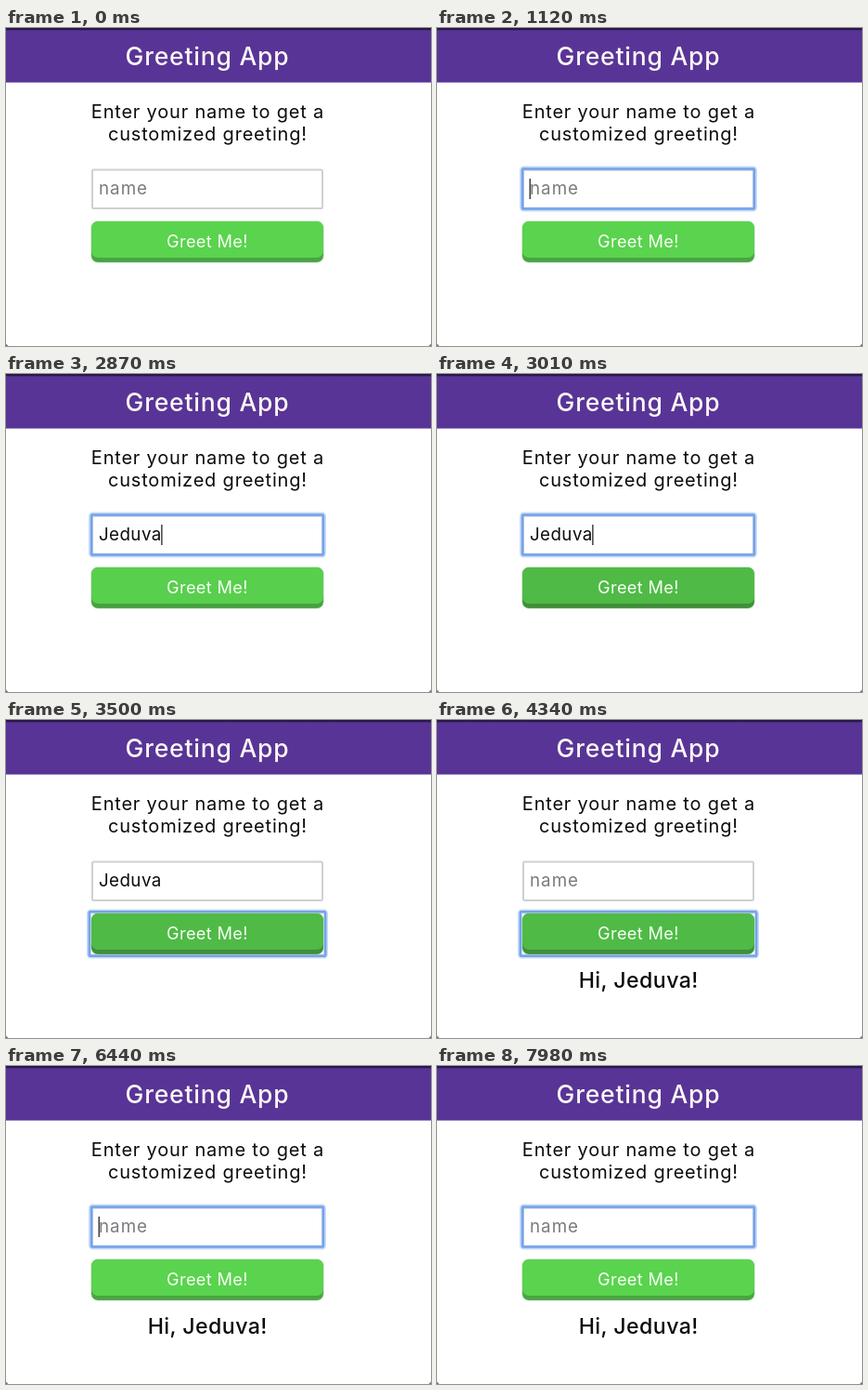
These frames come from a looping animation (458 px wide and 342 px high, 8 s). An HTML page:

```html
<!DOCTYPE html>
<html lang="en">
<head>
<meta charset="utf-8">
<title>Greeting App</title>
<style>
  html, body { margin: 0; width: 100%; height: 100%; overflow: hidden; background: #fff; }
  svg { display: block; width: 458px; height: 342px; }
  text { font-family: Inter, "Open Sans", sans-serif; fill: #0c0c0c; white-space: pre; }
  .mid { text-anchor: middle; }
  .title { font-size: 26.5px; font-weight: 500; letter-spacing: .8px; fill: #fbf8f4; }
  .intro { font-size: 20px; letter-spacing: .8px; }
  .field { font-size: 18.8px; letter-spacing: .4px; }
  .hint { letter-spacing: 1px; fill: #7b7b80; }
  .label { font-size: 18.2px; letter-spacing: .35px; fill: #f7fff5; }
  .reply { font-size: 23.2px; font-weight: 450; letter-spacing: .4px; }
  .ring rect { fill: none; }
  .glow { stroke: #a9c8f4; stroke-width: 5; opacity: .65; }
  .line { stroke: #74a3e8; stroke-width: 2.4; }
</style>
</head>
<body>
<svg viewBox="0 0 458 342">
  <defs>
    <linearGradient id="edge" x2="0" y2="1">
      <stop offset="0" stop-color="#2c1a4c"/>
      <stop offset=".4" stop-color="#21143a"/>
      <stop offset="1" stop-color="#593497"/>
    </linearGradient>
    <clipPath id="pill"><rect x="92" y="208" width="250" height="44" rx="7"/></clipPath>
  </defs>
  <rect width="458" height="342" fill="#fff"/>
  <rect width="458" height="58.6" fill="#593497"/>
  <rect width="458" height="3" fill="url(#edge)"/>
  <path d="M0 339.5V342H2.5ZM458 339.5V342H455.5Z" fill="#777"/>

  <text class="mid title" x="217" y="40">Greeting App</text>
  <text class="mid intro" x="217.4" y="97">Enter your name to get a</text>
  <text class="mid intro" x="217.4" y="121">customized greeting!</text>

  <rect x="93" y="152.5" width="248" height="41.5" rx="1.5" fill="#fff" stroke="#cdd0d3" stroke-width="2"/>
  <g class="ring" id="fieldRing">
    <rect class="glow" x="91.5" y="151" width="251" height="44" rx="2"/>
    <rect class="line" x="92" y="151.5" width="250" height="43" rx="1"/>
  </g>
  <text class="field hint" id="hint" x="100" y="179">name</text>
  <text class="field" id="typed" x="100" y="179"></text>
  <rect id="caret" y="162" width="1.2" height="22" fill="#111"/>

  <g class="ring" id="buttonRing">
    <rect class="glow" x="89.5" y="206" width="255" height="48" rx="2"/>
    <rect class="line" x="89.8" y="206.2" width="254.4" height="47.6" rx="1"/>
  </g>
  <g clip-path="url(#pill)">
    <rect id="base" x="92" y="208" width="250" height="44"/>
    <rect id="face" x="92" y="202" width="250" height="45" rx="7"/>
  </g>
  <rect x="91.7" y="207.7" width="250.6" height="44.4" rx="7.3" fill="none" stroke="#8fce89" stroke-opacity=".45"/>
  <text class="mid label" x="217" y="236">Greet Me!</text>
  <text class="mid reply" id="reply" x="217.2" y="288"></text>
</svg>
<script>
const LOOP = 8000;
const NAME = "Jeduva";
const KEYS = [2170, 2310, 2380, 2450, 2590, 2730];
const FOCUS = 1120, PRESS = 3430, SEND = 3570, REFOCUS = 6370;
const BLINK = 500;

const el = id => document.getElementById(id);
const show = (id, on) => el(id).setAttribute("visibility", on ? "visible" : "hidden");
const between = (t, a, b) => t >= a && t < b;
const ramp = (t, a, b) => Math.min(1, Math.max(0, (t - a) / (b - a)));
const smooth = k => k * k * (3 - 2 * k);
const mix = (a, b, k) => `rgb(${a.map((v, i) => Math.round(v + (b[i] - v) * k))})`;

// The caret restarts its blink whenever the field is focused or a key is typed.
function caretOn(t, focused) {
  if (!focused) return false;
  const last = [FOCUS, ...KEYS, REFOCUS + 45].filter(k => k <= t).pop();
  return t < REFOCUS + 45 && t >= REFOCUS || Math.floor((t - last) / BLINK) % 2 === 0;
}

function draw(t) {
  const count = t < SEND ? KEYS.filter(k => k <= t).length : 0;
  const focused = between(t, FOCUS, PRESS) || t >= REFOCUS;
  const hover = smooth(ramp(t, 2820, 3010)) - smooth(ramp(t, 4345, 4520));

  el("typed").textContent = NAME.slice(0, count);
  el("reply").textContent = t >= SEND ? `Hi, ${NAME}!` : "";
  show("hint", count === 0);
  show("fieldRing", focused);
  show("buttonRing", between(t, PRESS, REFOCUS));
  show("caret", caretOn(t, focused));
  el("caret").setAttribute("x", 99.6 + (count ? el("typed").getComputedTextLength() : 0));
  el("face").setAttribute("fill", mix([90, 211, 78], [79, 186, 70], hover));
  el("base").setAttribute("fill", mix([73, 164, 67], [64, 142, 58], hover));
}

const start = performance.now();
function tick() {
  draw((performance.now() - start) % LOOP);
  requestAnimationFrame(tick);
}
tick();
</script>
</body>
</html>
```
